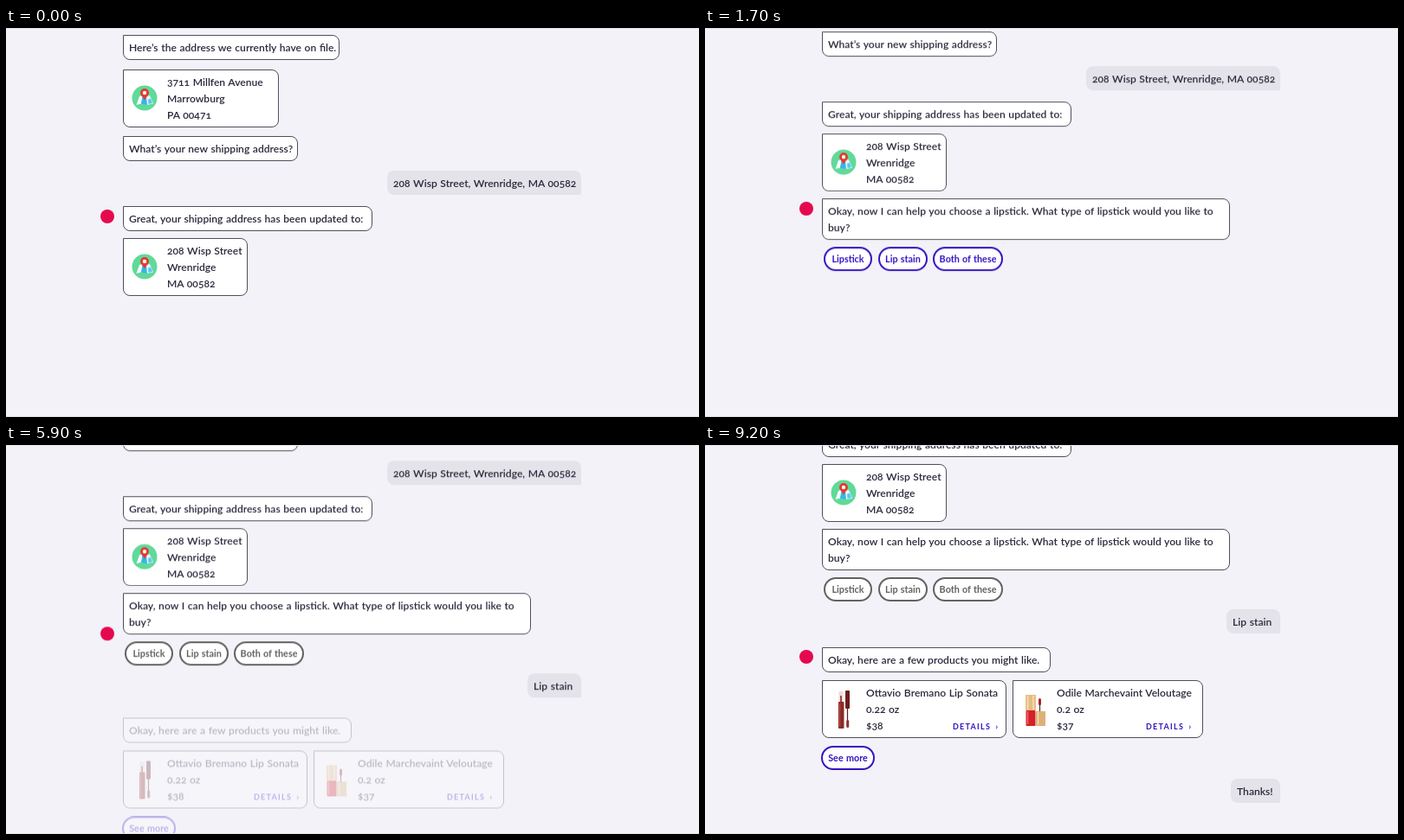
An HTML page that plays this animation: 800 px wide and 450 px high, repeating every 9300 ms.

```html
<!DOCTYPE html>
<html lang="en">
<head>
<meta charset="utf-8">
<title>Shopping chat</title>
<style>
  :root { --ink: #29273a; --violet: #3713c4; --loop: 9300ms linear infinite both; }
  html, body { margin: 0; width: 100%; height: 100%; overflow: hidden; }
  body { background: #f2f2f8; }

  .stage {
    position: relative; width: 800px; height: 450px; overflow: hidden;
    background: #f2f2f8; color: var(--ink);
    font: 600 12.1px/19px Lato, "Open Sans", sans-serif;
    font-variant-numeric: oldstyle-nums; word-spacing: .6px;
  }
  .stage::after {
    content: ""; position: absolute; inset: 0;
    border: solid #e2e2e7; border-width: 1px 0;
  }
  .thread { position: absolute; inset: 0; animation: scroll var(--loop); }
  .thread div, .pic, .details { position: absolute; box-sizing: border-box; white-space: nowrap; }

  .bot {
    left: 135px; height: 29px; padding: 4px 6px;
    background: #fff; border: 1px solid #504f5b; border-radius: 0 8px 8px 8px;
  }
  .tall { height: 48px; }
  .card { height: 67px; padding-left: 50px; }
  .user {
    right: 136px; height: 28px; padding: 4.5px 7px;
    background: #e3e3e9; border-radius: 8px 8px 1px 8px;
  }
  .pill {
    height: 28px; background: #fff; border: 2px solid var(--violet); border-radius: 14px;
    color: var(--violet); font-size: 10.8px; font-weight: 700; line-height: 24px; text-align: center;
  }
  .pic { left: 8px; top: 16px; width: 32px; height: 32px; overflow: visible; }
  .details {
    top: 43px; color: var(--violet);
    font-size: 9px; font-weight: 700; letter-spacing: 1.25px; word-spacing: 2px;
  }
  .avatar {
    position: absolute; left: 109px; top: 210px; width: 16px; height: 16px;
    border-radius: 50%; background: #e5084f; animation: avatar var(--loop);
  }

  .ask { --rise: 10px; animation: ask var(--loop); }
  .choice { --rise: 20px; animation: ask var(--loop), spent var(--loop); }
  .reply { --rise: 8px; animation: reply var(--loop); }
  .offer { --rise: 10px; animation: offer var(--loop); }
  .thanks { --rise: 8px; animation: thanks var(--loop); }

  @keyframes scroll {
    0%, 11.76% { transform: none; animation-timing-function: cubic-bezier(.55, 0, .5, 1); }
    18.49%, 61.51% { transform: translateY(-121px); animation-timing-function: cubic-bezier(.5, 0, .4, 1); }
    67.1%, 100% { transform: translateY(-221px); }
  }
  @keyframes avatar {
    0%, 11.76% { transform: none; animation-timing-function: cubic-bezier(.55, 0, .5, 1); }
    18.49%, 61.51% { transform: translateY(-9px); animation-timing-function: cubic-bezier(.5, 0, .4, 1); }
    67.1%, 100% { transform: translateY(27px); }
  }
  @keyframes ask {
    0%, 12.37% { opacity: 0; transform: translateY(var(--rise)); }
    17.74%, 100% { opacity: 1; transform: none; }
  }
  @keyframes spent {
    0%, 39.25% { color: var(--violet); border-color: var(--violet); }
    44.62%, 100% { color: #626262; border-color: #626262; }
  }
  @keyframes reply {
    0%, 39.25% { opacity: 0; transform: translateY(var(--rise)); }
    44.62%, 100% { opacity: 1; transform: none; }
  }
  @keyframes offer {
    0%, 62.26% { opacity: 0; transform: translateY(var(--rise)); }
    66.56%, 100% { opacity: 1; transform: none; }
  }
  @keyframes thanks {
    0%, 87.63% { opacity: 0; transform: translateY(var(--rise)); }
    93.01%, 100% { opacity: 1; transform: none; }
  }
</style>
</head>
<body>
<svg width="0" height="0" style="position:absolute">
  <symbol id="map" viewBox="0 0 32 32" overflow="visible">
    <circle cx="16" cy="16" r="14.5" fill="#61d999"/>
    <path d="M10 14 6.500 24l5.500-1.500 2-9.500z" fill="#f4fbff"/>
    <path d="M14 13l-2 9.500 7 1.500-1-10z" fill="#35b5ec"/>
    <path d="M18 14l1 10 7-1.500L22 13z" fill="#e4f5fd"/>
    <path d="M20 18l3-1.500 2 5.500-4.500 1z" fill="#5ac6f2"/>
    <path d="M16 19c-1-4-5-5.500-5-9a5 5 0 0 1 10 0c0 3.500-4 5-5 9z" fill="#e5392f"/>
    <circle cx="16" cy="10" r="2.200" fill="#fff"/>
  </symbol>
  <symbol id="gloss" viewBox="0 0 32 32" overflow="visible">
    <rect x="9.500" y="-5" width="5" height="13" rx="1" fill="#eadedb"/>
    <path d="M11 0h2v9h-2z" fill="#a3483f"/>
    <rect x="9" y="7" width="6.500" height="31" rx="1" fill="#8c2a25"/>
    <path d="M10.500 9v27" stroke="#b8574c"/>
    <rect x="17" y="-6" width="5" height="21" rx="1" fill="#6d1d1c"/>
    <path d="M19.500 15v14" stroke="#4f2020" stroke-width="1.200"/>
    <rect x="18.200" y="28" width="3" height="9" rx="1.500" fill="#8d302b"/>
  </symbol>
  <symbol id="stain" viewBox="0 0 32 32" overflow="visible">
    <rect x="5" y="-1" width="12" height="18" fill="#e6bd83"/>
    <path d="M7.500 0v16M14 0v16" stroke="#f6dfb8" stroke-width="1.500"/>
    <rect x="5.500" y="17" width="11" height="18" rx="1" fill="#d32127"/>
    <path d="M7.500 18v15" stroke="#f0696a" stroke-width="1.500"/>
    <rect x="20" y="3" width="3" height="8" rx="1.500" fill="#a92328"/>
    <path d="M21.500 10v9" stroke="#54302d" stroke-width="1.200"/>
    <rect x="17" y="18" width="11" height="17" fill="#ddb176"/>
    <path d="M19.500 19v15" stroke="#f6dfb8" stroke-width="1.500"/>
  </symbol>
</svg>

<main class="stage">
  <section class="thread">
    <div class="bot" style="top:8px;width:250px">Here’s the address we currently have on file.</div>
    <div class="bot card" style="top:48px;width:180px">
      <svg class="pic"><use href="#map"/></svg>3711 Millfen Avenue<br>Marrowburg<br>PA 00471
    </div>
    <div class="bot" style="top:125px;width:202px">What’s your new shipping address?</div>
    <div class="user" style="top:165px;width:224px">208 Wisp Street, Wrenridge, MA 00582</div>
    <div class="bot" style="top:206px;width:288px">Great, your shipping address has been updated to:</div>
    <div class="bot card" style="top:243px;width:144px">
      <svg class="pic"><use href="#map"/></svg>208 Wisp Street<br>Wrenridge<br>MA 00582
    </div>

    <div class="bot tall ask" style="top:318px;width:471px">Okay, now I can help you choose a lipstick. What type of lipstick would you like to<br>buy?</div>
    <div class="pill choice" style="top:374px;left:137px;width:56px">Lipstick</div>
    <div class="pill choice" style="top:374px;left:200px;width:57px">Lip stain</div>
    <div class="pill choice" style="top:374px;left:263px;width:81px">Both of these</div>
    <div class="user reply" style="top:411px;width:62px">Lip stain</div>

    <div class="bot offer" style="top:455px;width:264px">Okay, here are a few products you might like.</div>
    <div class="bot card offer" style="top:493px;width:213px">
      <svg class="pic"><use href="#gloss" x="1" y="1"/></svg>Ottavio Bremano Lip Sonata<br>0.22 oz<br>$38
      <span class="details" style="left:150px">DETAILS ›</span>
    </div>
    <div class="bot card offer" style="top:493px;left:355px;width:220px">
      <svg class="pic"><use href="#stain" x="1" y="1"/></svg>Odile Marchevaint Veloutage<br>0.2 oz<br>$37
      <span class="details" style="left:153px">DETAILS ›</span>
    </div>
    <div class="pill offer" style="top:569px;left:134px;width:62px">See more</div>
    <div class="user thanks" style="top:607px;width:57px">Thanks!</div>
  </section>
  <i class="avatar"></i>
</main>
</body>
</html>
```
